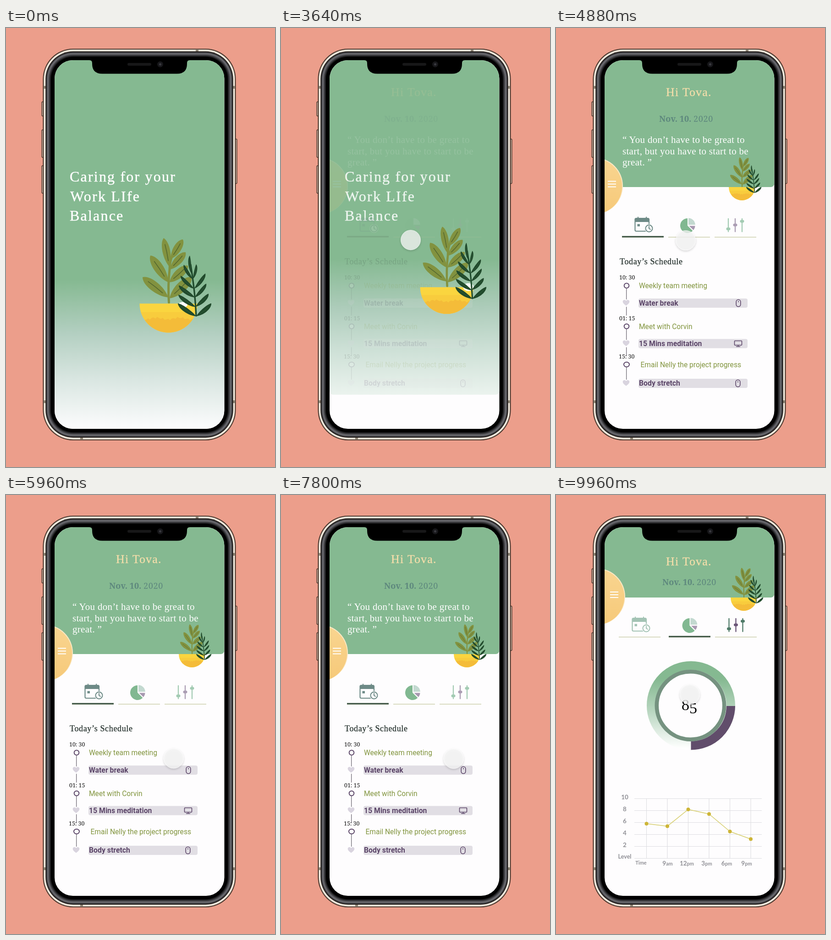
Animation, 587 px wide and 955 px high, one loop 10 s. Source, as an HTML page:

```html
<!DOCTYPE html>
<html lang="en">
<head>
<meta charset="utf-8">
<title>Work life balance app</title>
<style>
  html, body { margin: 0; width: 100%; height: 100%; overflow: hidden; background: #ec9e8b; }
  svg { display: block; width: 100vw; height: 100vh; }
  text { white-space: pre; }
  .serif { font-family: "Liberation Serif", serif; }
  .slab { font-family: "Noto Serif", serif; }
  .sans { font-family: Roboto, sans-serif; }
  .lato { font-family: Lato, sans-serif; font-weight: 700; fill: #8f8f95; }
  .big { font-size: 32px; letter-spacing: 2.2px; fill: #fff; stroke: #fff; stroke-width: .4px; }
  .quote { font-size: 21px; letter-spacing: .3px; fill: #fff; }
  .time { font-size: 12.4px; fill: #111; }
  .event { font-size: 15.6px; fill: #82953f; }
  .rest { font-size: 15.8px; font-weight: 700; fill: #5b4568; }
  .line { fill: none; stroke-linecap: round; stroke-linejoin: round; }
</style>
</head>
<body>
<svg viewBox="0 0 587 955" xmlns="http://www.w3.org/2000/svg">
  <defs>
    <linearGradient id="fade" x1="0" y1="0" x2="0" y2="1">
      <stop offset=".61"/><stop offset=".75"/><stop offset=".87"/><stop offset="1"/>
    </linearGradient>
    <linearGradient id="ring" gradientUnits="userSpaceOnUse" x1="0" y1="362" x2="0" y2="552">
      <stop offset=".2" stop-color="#85b991"/><stop offset=".55" stop-color="#b5d4bd"/><stop offset="1" stop-color="#fff"/>
    </linearGradient>
    <linearGradient id="tabFill" x1="0" y1="0" x2="0" y2="1">
      <stop offset="0" stop-color="#f9d590"/><stop offset="1" stop-color="#f6c979"/>
    </linearGradient>
    <clipPath id="screen"><rect x="106" y="70" width="370.5" height="802" rx="40"/></clipPath>
    <clipPath id="bowl"><path d="M291.5 599.5H417.5A63 63 0 0 1 291.5 599.5Z"/></clipPath>
    <filter id="shadow" x="-40%" y="-40%" width="180%" height="190%">
      <feDropShadow dx="0" dy="2" stdDeviation="2" flood-color="#000" flood-opacity=".22"/>
    </filter>
  </defs>

  <rect width="587" height="955" fill="#ec9e8b"/>
  <g id="phone"></g>

  <g clip-path="url(#screen)">
    <rect x="106" y="70" width="371" height="802" fill="#fefdfe"/>
    <rect id="header" x="106" y="40" width="370.5" rx="8" fill="url(#fade)"/>
    <g id="welcome" class="serif big">
      <text x="139" y="334">Caring for your</text>
      <text x="140" y="377">Work LIfe</text>
      <text x="139" y="419">Balance</text>
    </g>
    <g id="dash">
      <g id="menu">
        <circle cx="84.7" cy="343.5" r="61.3" fill="#fbe9c6"/>
        <circle cx="84" cy="344.3" r="60.3" fill="url(#tabFill)"/>
        <path d="M113 333.5h18m-18 6h18m-18 6h18" stroke="#fff" stroke-width="2"/>
      </g>
      <text id="hello" class="serif" x="240" y="148" font-size="26" letter-spacing="1.2" fill="#f5deaa" stroke="#f5deaa" stroke-width=".3">Hi Tova.</text>
      <text id="date" class="slab" x="225" y="203.5" font-size="18" fill="#5d877d"><tspan font-weight="700">Nov. 10.</tspan><tspan x="300" letter-spacing=".7">2020</tspan></text>
      <g id="tabs"></g>
      <g id="plan">
        <g class="serif quote">
          <text x="145" y="249.5">“ You don’t have to be great to</text>
          <text x="145" y="274.5">start, but you have to start to be</text>
          <text x="145" y="299">great. ”</text>
        </g>
        <text class="serif" x="139" y="514" font-size="18" letter-spacing=".65" fill="#222e2a" stroke="#222e2a" stroke-width=".25">Today’s Schedule</text>
        <g id="list"></g>
      </g>
      <g id="stats"></g>
    </g>
    <g id="plant"></g>
    <ellipse id="blob" fill="#fff"/>
    <g id="sprig"></g>
  </g>

  <path d="M182 69H401V70Q395 70 395 76V78Q395 99.5 373 99.5H210Q188 99.5 188 78V76Q188 70 182 70Z"/>
  <rect x="265" y="76" width="52" height="6" rx="3" fill="#171718"/>
  <circle cx="336.5" cy="79" r="6.5" fill="#17171a"/><circle cx="336.5" cy="79" r="2.6" fill="#38383e"/>

  <path id="arrow" d="M0 0V16L3.7 12.6L6.3 18.3L8.8 17.2L6.3 11.6H11.4Z" stroke="#fff" stroke-width="1.2"/>
  <g id="touch" filter="url(#shadow)">
    <circle r="21.5" fill="#f6f6f6" fill-opacity=".75" stroke="#fff" stroke-opacity=".6"/>
  </g>
</svg>
<script>
const $ = id => document.getElementById(id);
const LOOP = 10000, GREEN = '#85b991';
const lerp = (a, b, k) => a + (b - a) * k;
const clamp = k => Math.max(0, Math.min(1, k));
const easeOut = k => 1 - (1 - clamp(k)) ** 2;
const smooth = k => k * k * (3 - 2 * k);
const rgb = hex => [1, 3, 5].map(i => parseInt(hex.slice(i, i + 2), 16));
const mix = (a, b, k) => {
  const to = rgb(b);
  return `rgb(${rgb(a).map((v, i) => Math.round(lerp(v, to[i], k)))})`;
};
const move = (id, x, y) => $(id).setAttribute('transform', `translate(${x} ${y})`);
const show = (id, k) => $(id).setAttribute('opacity', k);

function box(x0, y0, x1, y1, r, fill) {
  return `<rect x="${x0}" y="${y0}" width="${x1 - x0}" height="${y1 - y0}" rx="${r}" fill="${fill}"/>`;
}

function drawPhone() {
  const key = (x, y, h) => `<rect x="${x}" y="${y}" width="6" height="${h}" rx="2" fill="#cdae9b" stroke="#4a352b" stroke-width="1.3"/>`;
  const band = (x, y, w, h) => box(x, y, x + w, y + h, 0, '#8d8474');
  const shell = (d, fill) => box(80.5 + d, 45 + d, 501.5 - d, 897 - d, 66 - d, fill);
  $('phone').innerHTML =
    key(78, 160.5, 31) + key(78, 221.5, 60) + key(78, 299.5, 60) + key(498, 241.5, 97) +
    shell(0, '#3c2b24') + shell(1.6, '#b9a795') + shell(2.6, '#f3ece1') +
    band(414, 46.5, 6, 6) + band(162, 890, 6, 5.5) +
    [126, 810].map(y => band(82, y, 6, 6) + band(494, y, 6, 6)).join('') +
    shell(5.8, '#1d1815') + shell(7.5, '#3d3d41') + shell(9.5, '#68686d') +
    shell(12.5, '#47474b') + shell(15, '#202022') + shell(17.5, '#000');
}

// Leaf from its base to its tip, w wide, bowed sideways, with a vein
function leaf([bx, by, tx, ty, w], fill, vein, bow = 0) {
  const dx = tx - bx, dy = ty - by, n = Math.hypot(dx, dy), h = w / 1.5;
  const b = bow * Math.sign(dx);
  const at = (k, o) => `${(bx + dx * k - dy / n * o).toFixed(1)} ${(by + dy * k + dx / n * o).toFixed(1)}`;
  return `<path fill="${fill}" d="M${at(0, 0)}C${at(.3, h + b)} ${at(.85, h + b)} ${at(1, 0)}C${at(.85, b - h)} ${at(.3, b - h)} ${at(0, 0)}Z"/>` +
    `<path class="line" stroke="${vein}" stroke-width="${w > 13 ? 1.6 : .7}" d="M${at(.22, b * .5)}Q${at(.5, b + 1)} ${at(.78, b * .5)}"/>`;
}

function drawPlant() {
  const olive = [
    [357, 520, 344, 457, 17], [360, 502, 386, 460, 17], [354, 553, 315, 495, 21], [358, 525, 392, 488, 17],
    [354, 586, 298, 542, 21], [357, 553, 397, 517, 19], [357, 588, 405, 542, 22]
  ];
  const dark = [
    [405, 535, 401, 495, 6], [408, 546, 415, 514, 6], [407, 546, 388, 515, 7], [411, 567, 435, 534, 8],
    [410, 567, 381, 539, 8], [412, 586, 437, 556, 8], [412, 586, 377, 560, 9], [414, 606, 442, 578, 9],
    [414, 607, 376, 580, 9], [415, 627, 448, 599, 10], [415, 627, 375, 599, 10]
  ];
  const edge = Array.from({ length: 33 }, (_, i) => `L${290 + i * 4} ${(632 + 2 * Math.sin(i * 2.3) + 2 * Math.sin(i * .5)).toFixed(1)}`).join('');
  $('plant').innerHTML =
    '<path class="line" stroke="#82923f" stroke-width="5" d="M355.5 597Q353 560 357 525Q357 510 362 497"/>' +
    olive.map(l => leaf(l, '#82923f', '#52662f')).join('') +
    `<g clip-path="url(#bowl)"><rect x="290" y="599" width="130" height="66" fill="#fad53f"/>` +
    `<rect x="290" y="618" width="130" height="50" fill="#f8cc3d"/>` +
    `<path fill="#f4bc39" d="M290 670${edge}L420 670Z"/></g>`;
  $('sprig').innerHTML =
    '<path class="line" stroke="#1f4b2c" stroke-width="3.4" d="M415 626Q413 590 410 565Q407 540 403 515"/>' +
    dark.map(l => leaf(l, '#20492b', '#37653f', 2.5)).join('');
}

function drawTabs() {
  const icons = [
    `<g class="line" stroke="currentColor" stroke-width="2.2"><rect x="172.5" y="414" width="30.5" height="28" rx="2.5"/>
     <path d="M179 411.5v5M197 411.5v5"/></g><path d="M172.5 414h30.5v8h-30.5zM177.5 426.5h5.5v5h-5.5z" fill="currentColor"/>
     <circle cx="203" cy="436" r="9.5" fill="#fefdfe"/><g class="line" stroke="currentColor" stroke-width="2">
     <circle cx="203" cy="436" r="7.5"/><path d="M203 431.5v4.7l3 1.8"/></g>`,
    `<path fill="#81b891" d="M287 430V414A16 16 0 1 0 298.3 441.3Z"/>
     <path fill="#c3d9d0" d="M289 428V413.5A15 15 0 0 1 303.8 428Z"/>
     <path fill="#a798b0" d="M290.5 430.5H303.5A14 14 0 0 1 299.8 439.5Z"/>`,
    [[376, 437], [391, 428.5], [406, 420.5]].map(([x, y], i) =>
      `<g class="${i == 1 ? 'knobB' : 'knobA'}"><path class="line" stroke="currentColor" stroke-width="2.3" d="M${x} 415V443"/>
       <rect x="${x - 4.5}" y="${y - 3}" width="9" height="6" rx="3" fill="currentColor"/></g>`).join('')
  ];
  $('tabs').innerHTML = icons.map((icon, i) => {
    const x = [144, 245, 346][i];
    return `<g id="tab${i}"><path d="M${x} 455h91" stroke="#cdd0ad" stroke-width="1.3"/>
      <path id="bar${i}" d="M${x} 454h91" stroke="#38503f" stroke-width="3"/><g id="icon${i}">${icon}</g></g>`;
  }).join('');
}

function drawList() {
  const rows = [
    [560.5, 138, '10: 30', 181, 'Weekly team meeting', 598.5, 'Water break'],
    [649, 138, '01: 15', 181, 'Meet with Corvin', 686.5, '15 Mins meditation'],
    [732, 137, '15: 30', 184.5, 'Email Nelly the project progress', 773, 'Body stretch']
  ];
  const mouse = (x, y) => `<rect x="${x - 4.8}" y="${y - 7.5}" width="9.6" height="15" rx="4.5"/><path d="M${x} ${y - 4}v1.5"/>`;
  $('list').innerHTML = rows.map(([y, tx, time, ex, event, by, rest], i) => `
    <path d="M153.7 ${y + 6}V${by - 8}${i < 2 ? `M153.7 ${by + 8}V${by + 27}` : ''}" stroke="#5a5560" stroke-width="1.1"/>
    <text class="slab time" x="${tx}" y="${y - 13.3}">${time}</text>
    <ellipse cx="154" cy="${y}" rx="${i == 2 ? 6 : 5.3}" ry="5.2" fill="#fff" stroke="#5f4a6b" stroke-width="2"/>
    <path transform="translate(153 ${by - 1})" fill="#d9d4df" d="M0 6.5C-5 3-7.3.5-7.3-2.5C-7.3-6.5-2-7.5 0-3.8C2-7.5 7.3-6.5 7.3-2.5C7.3.5 5 3 0 6.5Z"/>
    <text class="sans event" x="${ex}" y="${y + 5.7}">${event}</text>
    ${box(180, by - 10, 418, by + 10, 4, '#e1dee4')}
    <text class="sans rest" x="181" y="${by + 5.3}">${rest}</text>
    <g class="line" stroke="#5b4568" stroke-width="1.6">${i == 1
      ? '<rect x="389.5" y="680.5" width="16" height="9.5" rx="1"/><path d="M397.5 690v3M393.5 693h8"/>'
      : mouse(i ? 397 : 398, by)}</g>`).join('');
}

function drawStats() {
  const cols = [197.5, 243, 288.5, 334, 379.5, 425];
  const vals = [715, 720.5, 684, 694, 732, 748.5];
  const hours = ['9am', '12pm', '3pm', '6pm', '9pm'];
  const grid = cols.map((x, i) => `M${x} 660V790.5M171 ${660.5 + i * 26}H449`).join('');
  $('stats').innerHTML = `
    <circle cx="294.5" cy="458" r="87" fill="none" stroke="url(#ring)" stroke-width="19"/>
    <path d="M381.5 459A87 87 0 0 1 294.5 545" fill="none" stroke="#614d6b" stroke-width="19"/>
    <circle cx="293.5" cy="458" r="73.7" fill="#fefdfe" stroke="#759280" stroke-width="8.6"/>
    <text class="serif" font-size="34" y="468" x="274">8<tspan dy="7">5</tspan></text>
    <path d="${grid}" stroke="#dddde1" stroke-width="1.1"/>
    <polyline class="line" stroke="#d6cd6c" stroke-width="1.5" points="${cols.map((x, i) => x + ',' + vals[i]).join(' ')}"/>
    ${cols.map((x, i) => `<circle cx="${x}" cy="${vals[i]}" r="4" fill="#cdb537"/>`).join('')}
    <g class="lato" text-anchor="middle" font-size="13.5">
      ${[10, 8, 6, 4, 2].map((n, i) => `<text x="150" y="${661.5 + i * 26}">${n}</text>`).join('')}
      <text x="150" y="791" font-size="12.5">Level</text><text x="185.5" y="804" font-size="11">Time</text>
      ${hours.map((h, i) => `<text x="${[243.5, 285.5, 329, 372.5, 416][i]}" y="806">${h.slice(0, -2)}<tspan font-size="11">${h.slice(-2)}</tspan></text>`).join('')}
    </g>`;
}

// time, x, y of the pointer tip
const path = [
  [1500, 600, 560], [2200, 336, 487], [2500, 336, 487], [3000, 283, 461], [5400, 283, 462],
  [6400, 423, 650], [7400, 423, 650], [8400, 292, 434], [LOOP, 292, 434]
];

function pointer(t) {
  const i = Math.max(1, path.findIndex(p => p[0] > t));
  const [a, b] = [path[i - 1], path[i]];
  const k = smooth(clamp((t - a[0]) / (b[0] - a[0])));
  return [lerp(a[1], b[1], k), lerp(a[2], b[2], k)];
}

function render(t) {
  const p = easeOut((t - 3597) / 600);
  const q = easeOut((t - 9300) / 600);
  const through = (a, b, c) => lerp(a, b, p) + (c - b) * q;

  $('header').setAttribute('height', through(872, 346, 223) - 40);
  const stops = $('fade').children;
  [GREEN, '#b3cfc1', '#d9e6e1', '#fcfcfd'].forEach((c, i) => stops[i].setAttribute('stop-color', mix(c, GREEN, p)));

  const scale = lerp(1, .455, p);
  const place = `translate(${through(291.5, 377, 381)} ${through(599.5, 346, 223)}) scale(${scale}) translate(-291.5 -599.5)`;
  $('plant').setAttribute('transform', place);
  $('sprig').setAttribute('transform', place);

  const blob = { cx: lerp(386, 549, p), cy: lerp(602, 330, p), rx: lerp(10, 22, p), ry: lerp(6, 25, p), opacity: 1 - .7 * p };
  for (const key in blob) $('blob').setAttribute(key, blob[key]);

  show('welcome', 1 - p);
  show('dash', p);
  show('plan', 1 - q);
  show('stats', q);
  move('menu', 5 * q, -122.5 * q);
  move('hello', 0, 5 * q);
  move('date', 7 * q, -8 * q);

  [-7, 1, 1].forEach((x, i) => {
    move('tab' + i, x * q, -146 * q);
    move('icon' + i, [1, 3.5, .5][i] * q, 0);
    show('bar' + i, [1 - q, q, 0][i]);
  });
  $('icon0').style.color = mix('#6d8a86', '#a3c3b4', q);
  document.querySelectorAll('.knobA').forEach(k => k.style.color = mix('#a3cbb3', '#4f7a68', q));
  document.querySelector('.knobB').style.color = mix('#ab9db3', '#6a5577', q);

  const [x, y] = pointer(t);
  move('arrow', x, y);
  move('touch', x, y);
  show('arrow', t >= 1500 && t < 2700 ? 1 : 0);
  show('touch', t >= 2700 ? 1 : 0);
}

drawPhone();
drawPlant();
drawTabs();
drawList();
drawStats();

const start = performance.now();
function tick() {
  render((performance.now() - start) % LOOP);
  requestAnimationFrame(tick);
}
tick();
</script>
</body>
</html>
```
